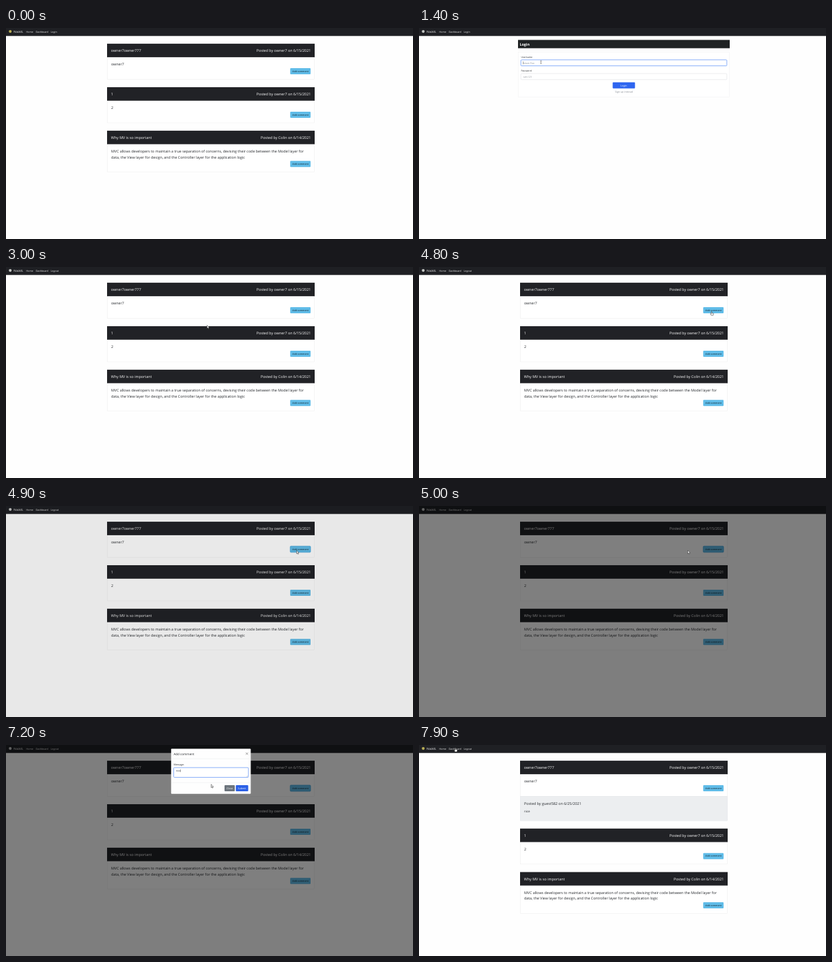
An HTML page for the animation above (8 s loop, 596 px wide and 310 px high).

```html
<!DOCTYPE html>
<html lang="en">
<head>
<meta charset="utf-8">
<title>Blog comments</title>
<style>
  html, body { margin: 0; width: 100%; height: 100%; overflow: hidden; background: #fefefe; }
  svg { display: block; width: 100vw; height: 100vh; }
  text { font-family: "Open Sans", "Noto Sans", sans-serif; text-rendering: geometricPrecision; white-space: pre; }
</style>
</head>
<body>
<svg id="stage" viewBox="0 0 596 310" xmlns="http://www.w3.org/2000/svg"></svg>
<script>
const LOOP = 8000;
const DARK = '#212226', INK = '#25282c', BLUE = '#2f66f0';
const svg = document.getElementById('stage');
const $ = id => document.getElementById(id);

const rect = (x, y, w, h, fill, extra = '') =>
  `<rect x="${x}" y="${y}" width="${w}" height="${h}" fill="${fill}" ${extra}/>`;
const text = (x, y, size, fill, str, extra = '') =>
  `<text x="${x}" y="${y}" font-size="${size}" fill="${fill}" ${extra}>${str}</text>`;
const line = (x1, y, x2, color) =>
  `<path d="M${x1} ${y}H${x2}" stroke="${color}" stroke-width=".35"/>`;
const MID = 'text-anchor="middle"', END = 'text-anchor="end"';

function button(x, y, w, h, fill, color, label, id = '') {
  return rect(x, y, w, h, fill, `rx="1" id="${id}"`) +
    text(x + w / 2, y + h / 2 + 1.3, 3.62, color, label, MID);
}

function card(title, by, lines, y, h, id) {
  const body = lines.map((s, i) => text(154, y + 32.1 + i * 8.6, 5.34, INK, s)).join('');
  return rect(148.2, y, 303.6, h, '#fff', 'stroke="#e6e6e7" stroke-width=".4"') +
    rect(148, y, 304, 19.8, DARK) +
    text(153.8, y + 11.9, 5.38, '#fff', title) +
    text(446.3, y + 11.9, 5.38, '#fff', `Posted by ${by}`, END) +
    body +
    button(416.2, y + h - 16.2, 29.8, 9, '#60bce8', '#10222c', 'Add comment', id);
}

const nav = rect(0, 0, 596, 11.7, '#1f2024') +
  '<circle id="logo" cx="6.2" cy="5.1" r="2.1"/>' +
  text(11.2, 7, 4.3, '#f4f4f4', 'NookIL') +
  text(29.6, 6.8, 3.58, '#f0f0f0', 'Home', 'id="homeLink"') +
  text(43.4, 6.8, 3.58, '#f0f0f0', 'Dashboard') +
  text(65.5, 6.8, 3.58, '#f0f0f0', 'Login', 'id="logLink"');

const home = '<g id="home">' +
  card('owner7owner777', 'owner7 on 6/15/2021', ['owner7'], 23.1, 52.1, 'firstBtn') +
  '<g id="reply">' +
  rect(148.2, 75.2, 303.6, 36, '#eceef0', 'stroke="#e2e3e5" stroke-width=".4"') +
  text(154, 88.1, 5.38, INK, 'Posted by guest582 on 6/25/2021') +
  text(154, 98.9, 4.4, INK, 'nice') + '</g>' +
  '<g id="rest">' +
  card('1', 'owner7 on 6/15/2021', ['2'], 87, 52.1, 'btn2') +
  card('Why MV is so important', 'Colin on 6/14/2021', [
    'MVC allows developers to maintain a true separation of concerns, devising their code between the Model layer for',
    'data, the View layer for design, and the Controller layer for the application logic'
  ], 150.9, 60.6, 'btn3') + '</g></g>';

const field = (id, y, hint) =>
  rect(149.2, y, 301.6, 8.8, '#fff', `id="${id}Box" rx="1"`) +
  text(152.4, y + 5.8, 3.5, '#8b9097', hint, `id="${id}Text"`);

const login = '<g id="login">' +
  rect(145.2, 35.2, 309.6, 66.3, '#fff', 'stroke="#ececed" stroke-width=".4"') +
  rect(145, 17.5, 310, 12.2, '#1f2223') +
  text(147.4, 25.7, 5.4, '#fff', 'Login', 'font-weight="700"') +
  text(149.4, 43.6, 3.45, INK, 'Username') + field('user', 46.8, 'Adam Poe') +
  text(149.4, 63.9, 3.45, INK, 'Password') + field('pass', 67, 'cats123') +
  button(283.6, 79.8, 32.7, 9, BLUE, '#fff', 'Login', 'loginBtn') +
  text(300, 94.9, 3.62, '#858b93', 'Sign up instead', MID) +
  '</g>';

const modal = '<g id="modal">' +
  rect(241.8, 5.5, 116.6, 66.2, '#fefefe', 'rx="1"') +
  text(245.4, 14.7, 4.6, INK, 'Add comment', 'font-weight="500"') +
  '<path d="M351.2 11.1l3.2 3.2m0-3.2l-3.2 3.2" stroke="#666" stroke-width=".6"/>' +
  line(241.8, 20.2, 358.4, '#dcdfe2') +
  text(245.4, 29.9, 3.6, INK, 'Message:') +
  rect(245.6, 33.2, 109.4, 14.3, '#fff', 'rx="1" id="noteBox"') +
  text(248.9, 39, 3.4, INK, '', 'id="noteText"') +
  '<path d="M352.2 46.8l2-2m-.9 2l.9-.9" stroke="#888" stroke-width=".3"/>' +
  line(241.8, 55.3, 358.4, '#dcdfe2') +
  button(320, 59, 15, 9, '#6c747c', '#fff', 'Close') +
  button(336.5, 59, 18.2, 9, '#2b60e6', '#fff', 'Submit', 'submitBtn') +
  '</g>';

const cursor = '<g id="cursor" stroke-width=".45" stroke-linejoin="round">' +
  '<path id="arrow" d="M0 0V4.7L1.1 3.7 1.9 5.4 2.7 5 2 3.4H3.4Z" fill="#fff" stroke="#111"/>' +
  '<path id="hand" d="M-.5.4Q0-.4.5.4V2.2L2.6 2.7Q3 2.9 2.9 3.5L2.4 5.6H-.4L-1.8 3.6Q-1.7 2.8-.5 3.6Z" fill="#fff" stroke="#111"/>' +
  '<path id="beam" d="M-.8-2.1H.8M0-2.1V2.1M-.8 2.1H.8" fill="none" stroke="#222"/></g>';

svg.innerHTML = rect(0, 0, 596, 310, '#fefefe') + nav + home + login +
  rect(0, 0, 596, 310, '#000', 'id="shade"') + modal +
  rect(0, 0, .35, 4.2, '#222', 'id="caret"') + cursor;

const set = (id, attrs) => {
  for (const k in attrs) $(id).setAttribute(k, attrs[k]);
};
const show = (id, on) => set(id, { display: on ? 'inline' : 'none' });
const ramp = (t, from, to) => Math.min(1, Math.max(0, (t - from) / (to - from)));
const smooth = u => u * u * (3 - 2 * u);
const count = (t, times) => times.filter(s => t >= s).length;

// Pointer path: time, x, y
const path = [
  [0, 466, 316], [100, 466, 316], [620, 70, 5], [980, 70, 5], [1300, 178.6, 50.2],
  [2450, 178.6, 50.2], [2690, 300, 84], [2820, 300, 84], [2980, 294.4, 85.6],
  [3500, 294.4, 85.6], [3900, 380, 54], [4350, 433, 63], [4520, 428.4, 65.4],
  [4880, 428.4, 65.4], [5000, 393.6, 65.3], [5500, 300, 42], [6680, 300, 42],
  [7000, 300.4, 57.8], [7220, 300.4, 57.8], [7380, 345, 62.5], [7560, 345, 62.5],
  [7860, 53.2, 4.4], [8000, 53.2, 4.4]
];

function pointer(t) {
  let i = 1;
  while (i < path.length - 1 && t > path[i][0]) i++;
  const [t0, x0, y0] = path[i - 1], [t1, x1, y1] = path[i];
  const u = smooth(ramp(t, t0, t1));
  return [x0 + (x1 - x0) * u, y0 + (y1 - y0) * u];
}

const userKeys = Array.from({ length: 8 }, (_, i) => 1520 + i * 65);
const passKeys = Array.from({ length: 8 }, (_, i) => 2120 + i * 45);
const noteKeys = [6080, 6260, 6440, 6490];

const inside = (x, y, l, t, r, b) => x >= l && x <= r && y >= t && y <= b;

function ring(id, on) {
  set(id, { stroke: on ? '#6f9df8' : '#ced2d6', 'stroke-width': on ? .8 : .4 });
}

function fill(id, str, hint) {
  $(id).textContent = str || hint;
  set(id, { fill: str ? INK : '#8b9097' });
}

function draw(t) {
  const onLogin = t >= 800 && t < 2800;
  const member = t >= 2800, replied = t >= 7500;
  const [x, y] = pointer(t);

  show('login', onLogin);
  show('home', !onLogin);
  show('reply', replied);
  set('rest', { transform: `translate(0 ${replied ? 35.8 : 0})` });
  $('logLink').textContent = member ? 'Logout' : 'Login';
  set('logo', { fill: onLogin || member && !replied ? '#c2c4c2' : '#b8ad55' });

  const inUser = t >= 1320 && t < 2060, inPass = t >= 2060 && t < 2800;
  const name = 'guest582'.slice(0, count(t, userKeys));
  const dots = '•'.repeat(count(t, passKeys));
  ring('userBox', inUser);
  ring('passBox', inPass);
  fill('userText', name, 'Adam Poe');
  fill('passText', dots, 'cats123');

  const open = t >= 4880 && !replied;
  const slide = 1 - (1 - ramp(t, 5040, 5340)) ** 2;
  show('shade', open);
  set('shade', { opacity: .5 * ramp(t, 4880, 5000) });
  show('modal', open && slide > 0);
  set('modal', { opacity: slide, transform: `translate(0 ${-15.5 * (1 - slide)})` });
  const inNote = t >= 5620 && t < 7360;
  ring('noteBox', inNote);
  const note = 'nice'.slice(0, count(t, noteKeys));
  $('noteText').textContent = note;
  set('firstBtn', {
    stroke: open ? '#3aa0d8' : 'none', 'stroke-width': .7
  });

  // Text caret
  let spot = null;
  if (inUser) spot = ['userText', name, 152.4, 49.1, 1320];
  else if (inPass) spot = ['passText', dots, 152.4, 69.3, 2060];
  else if (inNote) spot = ['noteText', note, 248.9, 35.6, 5620];
  show('caret', spot && (t - spot[4]) % 1060 < 530);
  if (spot) {
    const w = spot[1] ? $(spot[0]).getComputedTextLength() : 0;
    set('caret', { x: spot[2] + w, y: spot[3] });
  }

  // Pointer shape
  const overNav = inside(x, y, 29, 2, 78, 9);
  const overBtn = onLogin ? inside(x, y, 283, 79.8, 317, 89)
    : open ? slide > 0 && inside(x, y, 336, 59, 355, 68)
    : !replied && inside(x, y, 416, 59, 446, 68);
  const overField = onLogin
    ? inside(x, y, 149, 46.8, 451, 55.6) || inside(x, y, 149, 67, 451, 76)
    : open && slide > .5 && inside(x, y, 245, 33, 355, 48);
  const hand = !open && overNav || overBtn;
  show('hand', hand);
  show('beam', !hand && overField);
  show('arrow', !hand && !overField);
  set('cursor', { transform: `translate(${x} ${y})` });
  set('loginBtn', { fill: onLogin && overBtn ? '#2a5bd8' : BLUE });
  set('submitBtn', { fill: open && overBtn ? '#2452c6' : '#2b60e6' });
}

const start = performance.now();
function tick() {
  draw((performance.now() - start) % LOOP);
  requestAnimationFrame(tick);
}
tick();
</script>
</body>
</html>
```
